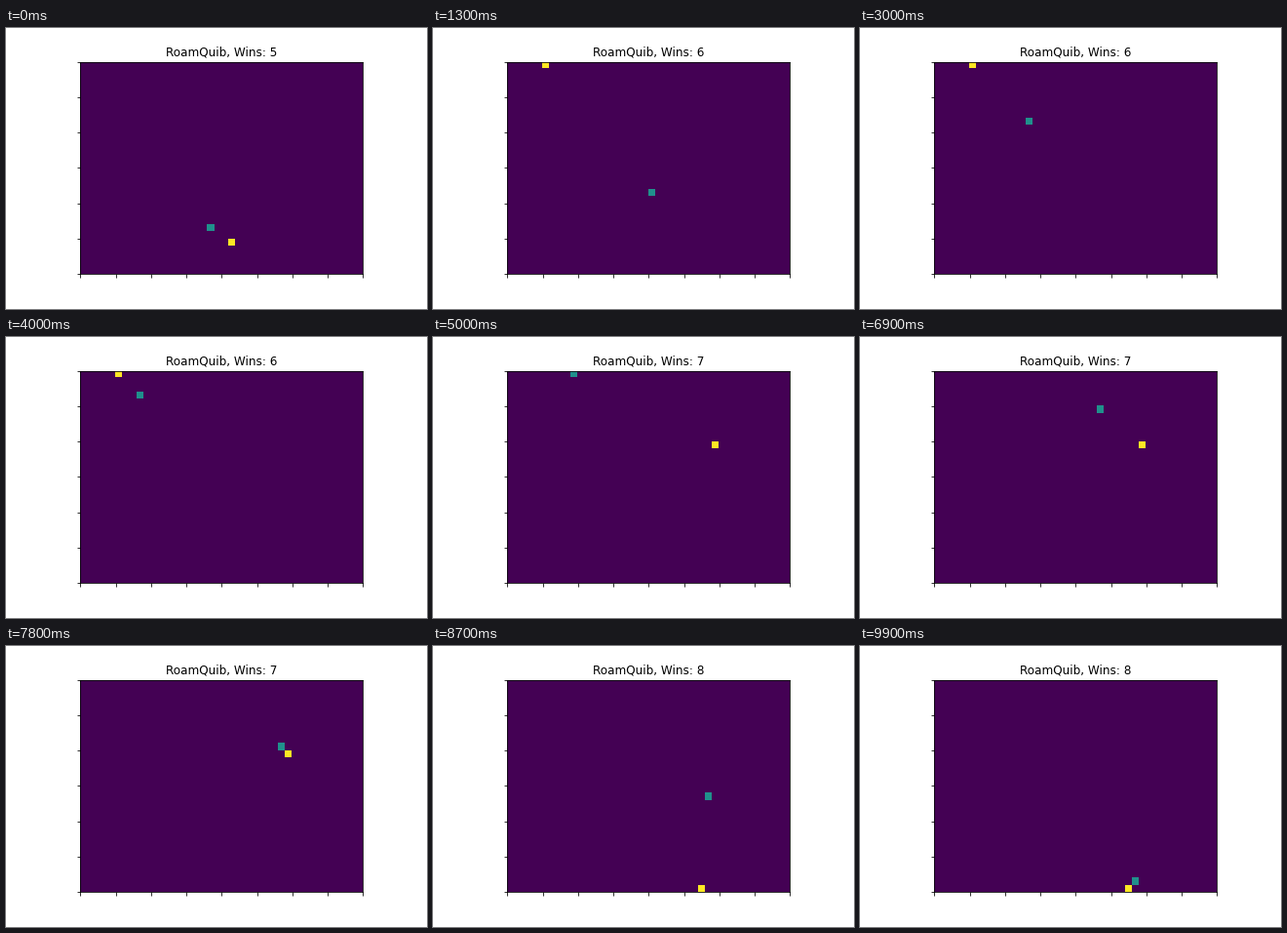
Recreate the animation shown at these times as a matplotlib script. Size 432 px wide and 288 px high, loop 10000 ms.

```python
import matplotlib.pyplot as plt
import numpy as np
from matplotlib.animation import FuncAnimation

COLS, ROWS = 40, 30
FRAMES, STEP_MS = 100, 100
PLAYER, GOAL = 1, 2
START, FIRST_WINS = (18, 23), 5
GOALS = [(21, 25), (5, 0), (29, 10), (27, 29)]


def step(pos, goal):
    """Move one cell along the longer remaining axis; ties go vertical."""
    (x, y), (gx, gy) = pos, goal
    dx, dy = gx - x, gy - y
    if abs(dx) > abs(dy):
        return x + int(np.sign(dx)), y
    return x, y + int(np.sign(dy))


def play():
    """Return (player, goal index) for every frame of one loop."""
    pos, level, rested = START, 0, False
    states = []
    for _ in range(FRAMES):
        states.append((pos, level))
        gx, gy = GOALS[level]
        if abs(gx - pos[0]) + abs(gy - pos[1]) > 1:
            pos = step(pos, GOALS[level])
        elif rested:
            level, rested = level + 1, False
        else:
            rested = True
    return states


def board(pos, goal):
    grid = np.zeros((ROWS, COLS))
    grid[pos[1], pos[0]] = PLAYER
    grid[goal[1], goal[0]] = GOAL
    return grid


def heading(level):
    return f"RoamQuib, Wins: {FIRST_WINS + level}"


STATES = play()

plt.rcParams["font.family"] = "DejaVu Sans"
fig, ax = plt.subplots(figsize=(6, 4), dpi=72)
fig.subplots_adjust(left=0.125, right=0.9, bottom=0.125, top=0.88)
image = ax.imshow(board(START, GOALS[0]), cmap="viridis", vmin=0, vmax=2,
                  interpolation="nearest", extent=(0, COLS, ROWS, 0))
ax.set_xticks(range(0, COLS + 1, 5))
ax.set_yticks(range(0, ROWS + 1, 5))
ax.tick_params(labelbottom=False, labelleft=False)
title = ax.set_title(heading(0), fontsize=12)


def draw(i):
    pos, level = STATES[i]
    image.set_data(board(pos, GOALS[level]))
    title.set_text(heading(level))
    return image, title


anim = FuncAnimation(fig, draw, frames=FRAMES, interval=STEP_MS,
                     repeat=True, repeat_delay=0)
plt.show()
```
